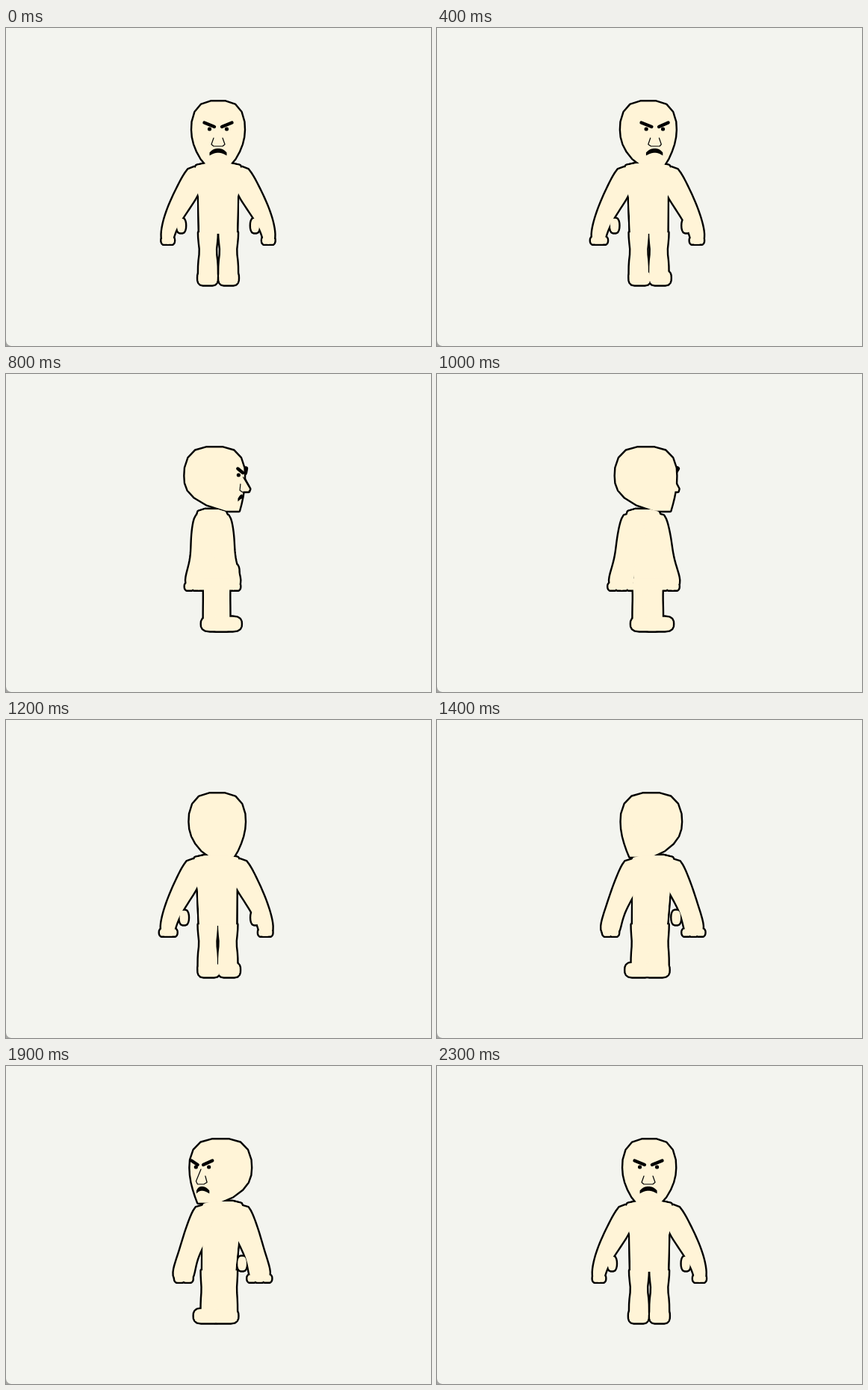
An HTML page with a canvas for the animation above (2.4 s loop, 569 px wide and 425 px high).

```html
<!DOCTYPE html>
<html lang="en">
<head>
<meta charset="utf-8">
<title>Turning figure</title>
<style>
html, body { margin: 0; width: 100%; height: 100%; overflow: hidden; background: #f3f4ef; }
canvas { display: block; }
</style>
</head>
<body>
<canvas id="stage" width="569" height="425"></canvas>
<script>
const ctx = document.getElementById('stage').getContext('2d');
const LOOP = 2400, STEP = 100, CX = 284;
const PAPER = '#f3f4ef', SKIN = '#fff4d7', INK = '#000', LINE = 2.4;

const smooth = t => t * t * (3 - 2 * t);
const superArc = (v, n) => Math.max(0, 1 - Math.abs(v) ** n) ** (1 / n);

// A part is a stack of rounded slices; shape(t) gives one slice for t in 0..1
const stack = (count, shape) =>
  Array.from({ length: count + 1 }, (_, i) => shape(i / count));

function blob(x, y, z, w, h, d, n = 2) {
  return stack(10, t => {
    const v = -Math.cos(Math.PI * t), r = superArc(v, n);
    return { y: y + h * v, x, z, w: w * r, d: d * r };
  });
}

// Rounded skull above the cheeks, a jaw that narrows and moves forward below
const skull = stack(3, t => {
  const v = Math.cos(0.2 + 1.1 * t), r = superArc(v, 2.5);
  return { y: 136 - 39.5 * v, x: 0, z: -5, w: 36 * r, d: 39 * r };
});
const jaw = stack(5, v => ({
  y: 136 + 48 * v, x: 0, z: -5 + 25 * v ** 3,
  w: 36 * (1 - 0.53 * v * v), d: 39 * (1 - 0.8 * v ** 2.8)
}));
const nose = stack(5, t => ({
  y: 136 + 22 * t, x: 0, z: 34 + 2 * t, w: 1 + 6 * t,
  d: 1 + 8.5 * Math.min(1.25 * t, 2.3 - 1.5 * t)
}));
const torso = [[180, 17, 9], [184, 30, 17], [192, 34, 20], [226, 27, 20], [276, 26, 16]]
  .map(([y, w, d]) => ({ y, x: 0, z: -9 + (y - 180) * 0.075, w, d }));

const arm = stack(24, t => {
  const cap = superArc(2 * t - 1, 9) ** 3;
  return {
    y: 185 + 103.5 * t, x: 32 + 36 * smooth(Math.min(1, t * 1.03)), z: -8 + t,
    w: (9 + 52 * t * (1 - t) ** 2) * cap,
    d: (16.3 + 3.2 * t * Math.cos(8.3 * (t - 0.92))) * cap
  };
});
const leg = stack(8, t => ({
  y: 272 + 62 * t, x: 13.6, z: -2, d: 14.3,
  w: 13.5 - 1.9 * Math.exp(-(((t - 0.42) * 5) ** 2))
}));
const thumb = blob(49.5, 264, 8, 6.7, 10.5, 6.7, 2.4);
const foot = blob(14, 334, 4.5, 14, 10.5, 24, 3);
const fingers = stack(3, t => t).map((t, i) =>
  blob(i % 2 ? 64.5 : 70, 284, 25 * t - 19.5, 6.5, 5.7, 6.5, 2.5));

const mirror = rows => rows.map(r => ({ ...r, x: -r.x }));
const parts = [{ rows: [...skull, ...jaw], round: 1.5 }, { rows: nose, round: 2 }];
for (const rows of [torso, arm, leg, thumb, foot, ...fingers])
  parts.push({ rows, round: 1.75 }, { rows: mirror(rows), round: 1.75 });

let c = 1, s = 0;
const px = (x, z) => CX + x * c + z * s;
const facing = (x, z) => z * c - x * s > 0;

function outline({ rows, round }) {
  const path = new Path2D(), left = [], right = [];
  const top = rows[0].y + LINE / 2, bottom = rows[rows.length - 1].y - LINE / 2;
  for (const { y, x, z, w, d } of rows) {
    const sum = Math.abs(w * c) ** round + Math.abs(d * s) ** round;
    const half = Math.max(0.2, sum ** (1 / round) - LINE / 2);
    const row = Math.min(bottom, Math.max(top, y));
    left.unshift([px(x, z) - half, row]);
    right.push([px(x, z) + half, row]);
  }
  for (const [x, y] of right.concat(left)) path.lineTo(x, y);
  path.closePath();
  return path;
}

function strokeLine(points, width) {
  ctx.lineWidth = width;
  ctx.beginPath();
  for (const [x, y, z] of points) ctx.lineTo(px(x, z), y);
  ctx.stroke();
}

function brows(front) {
  ctx.lineCap = 'round';
  for (const side of [-1, 1])
    if (facing(side * 12, 34) === front)
      strokeLine([[side * 18.5, 126.5, 33], [side * 5, 132, 36]], front ? 4.4 : 6.5);
}

function eyes() {
  for (const side of [-1, 1]) {
    if (!facing(side * 11.5, 32)) continue;
    ctx.beginPath();
    ctx.arc(px(side * 11.5, 32), 135, 2.6, 0, 7);
    ctx.fill();
  }
}

function noseLines() {
  if (c < 0.1) return;
  const wing = k => [[k * 6, 147, 33], [k * 9, 155.5, 33], [k * 6, 158, 36]];
  const ridge = [[0, 138, 35], [0, 154, 45], [0, 158, 42]];
  const from = s < -0.4 ? ridge : wing(-1);
  const to = s > 0.4 ? ridge : wing(1);
  strokeLine([...from, ...to.reverse()], 1.2);
}

function mouth() {
  const top = [], low = [];
  for (let u = -1; u <= 1; u += 0.125) {
    const x = 11.5 * u, z = 33 - 2 * u * u;
    if (!facing(x, z)) continue;
    top.push([px(x, z), 161 + 5.5 * Math.abs(u) ** 2.5]);
    low.unshift([px(x, z), 166.8 + 3.7 * u * u]);
  }
  if (top.length < 3) return;
  ctx.beginPath();
  for (const [x, y] of top.concat(low)) ctx.lineTo(x, y);
  ctx.fill();
}

function corner() {
  ctx.fillStyle = '#a6a6a4';
  ctx.beginPath();
  ctx.moveTo(0, 418);
  ctx.quadraticCurveTo(0.8, 424.2, 7, 425);
  ctx.lineTo(0, 425);
  ctx.fill();
}

function draw(time) {
  const t = Math.floor(time % LOOP / STEP) * STEP;
  const p = Math.max(0, (t - 120) / 2280);
  const turn = Math.PI * (1 - Math.cos(Math.PI * p));
  c = Math.cos(turn);
  s = Math.sin(turn);

  ctx.fillStyle = PAPER;
  ctx.fillRect(0, 0, 569, 425);
  corner();

  // Ink every part first, then cover with skin so only the joint outline stays
  const paths = parts.map(outline);
  ctx.strokeStyle = INK;
  ctx.lineJoin = 'round';
  ctx.lineWidth = LINE * 2;
  for (const path of paths) ctx.stroke(path);
  brows(false);
  ctx.fillStyle = SKIN;
  for (const path of paths) ctx.fill(path);

  ctx.fillStyle = INK;
  brows(true);
  eyes();
  noseLines();
  mouth();
}

function tick() {
  draw(performance.now());
  requestAnimationFrame(tick);
}
tick();
</script>
</body>
</html>
```
